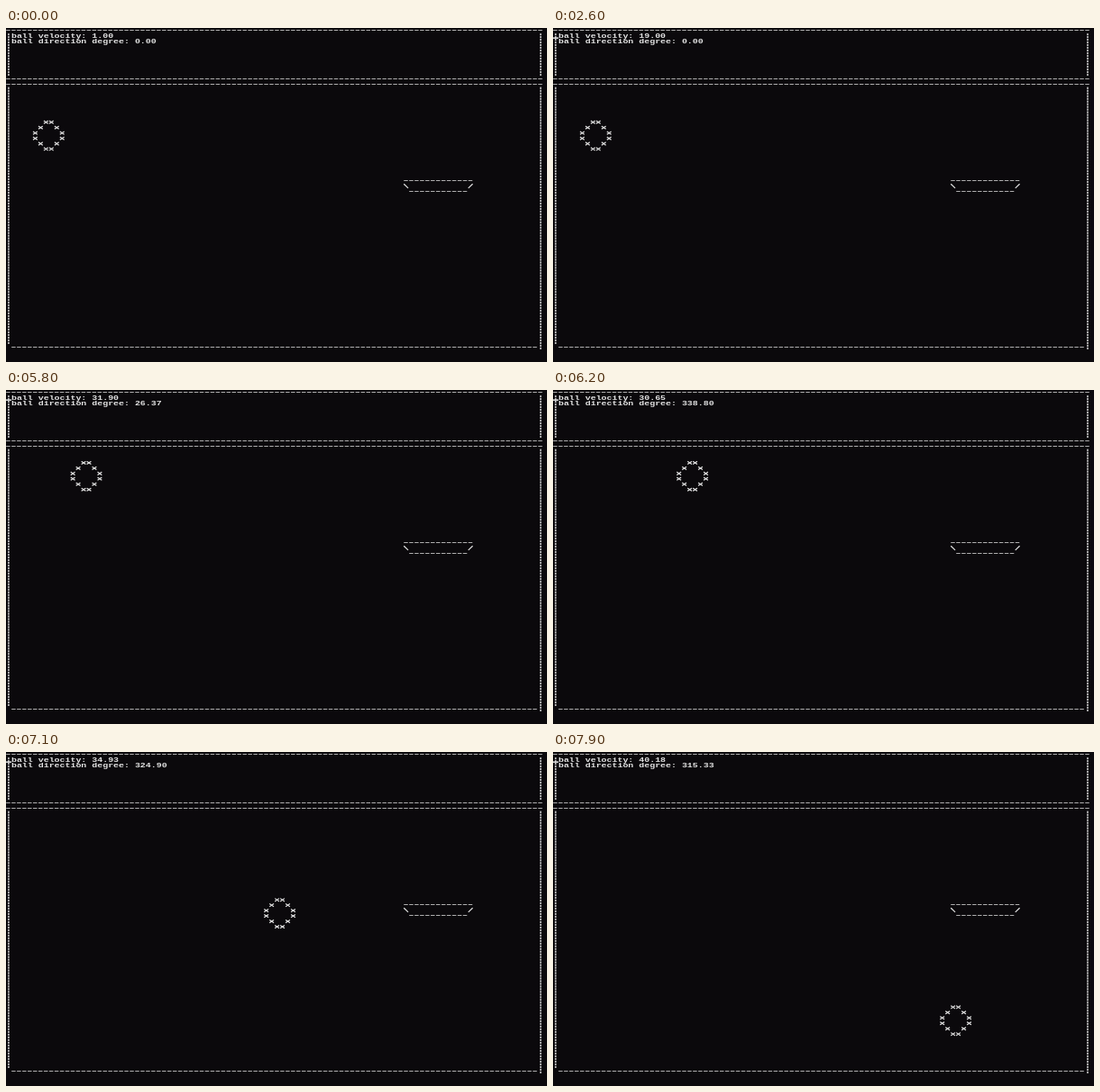
Animation, 600 px wide and 371 px high, one loop 8 s. Source, as an HTML page with a canvas:

```html
<!DOCTYPE html>
<html lang="en">
<head>
<meta charset="utf-8">
<title>Console ball</title>
<style>
  html, body { margin: 0; width: 100%; height: 100%; overflow: hidden; background: #0b090c; }
  canvas { display: block; }
</style>
</head>
<body>
<canvas id="stage" width="600" height="371"></canvas>
<script>
const ctx = document.getElementById('stage').getContext('2d');
const LOOP = 8000, TICK = 100, LAUNCH = 5800;
const CELL = 5.96;
const INK = '#cccccc', BRIGHT = '#e4e4e4', PAPER = '#0b090c';

// key points [ms, value], linear in between
const SPEED = [[400, 1], [1100, 6], [1700, 6], [2700, 20], [4100, 33]];
const ANGLE_STEPS = [[4200, 0], [4900, 5], [5300, 5], [5400, 4]];
const FLIGHT_SECONDS = [[5800, 0.2332], [6200, 0.617], [7100, 1.517], [7900, 2.3334]];

const GRAVITY = 10, VX = 33 * Math.cos(Math.PI / 6), VY = 33 * Math.sin(Math.PI / 6);
const BOUNCE_TIME = 0.417, REBOUND = 9.085;

function interpolate(points, t) {
  const next = points.findIndex(p => p[0] > t);
  if (next === 0) return points[0][1];
  if (next < 0) return points[points.length - 1][1];
  const [t0, a] = points[next - 1], [t1, b] = points[next];
  return a + (b - a) * (t - t0) / (t1 - t0);
}

const rise = (v, s) => v * s - GRAVITY * s * s / 2;

function ballState(t) {
  if (t < LAUNCH) {
    return {
      x: 0, y: 0,
      speed: Math.round(interpolate(SPEED, t)),
      angle: 7.5 * Math.round(interpolate(ANGLE_STEPS, t))
    };
  }
  const s = interpolate(FLIGHT_SECONDS, t), after = s - BOUNCE_TIME;
  const vy = after < 0 ? VY - GRAVITY * s : -REBOUND - GRAVITY * after;
  const y = after < 0 ? rise(VY, s) : rise(VY, BOUNCE_TIME) + rise(-REBOUND, after);
  const degrees = Math.atan2(vy, VX) * 180 / Math.PI;
  return { x: Math.round(VX * s), y: Math.round(y), speed: Math.hypot(VX, vy), angle: (degrees + 360) % 360 };
}

function dashes(row, from, to) {
  const y = Math.round(row * CELL + 2.2);
  for (let col = from; col <= to; col++) ctx.fillRect(col * CELL + 0.2, y, 4.5, 0.85);
}

function bars(col, from, to) {
  for (let row = from; row <= to; row++) {
    for (const part of [0.1, 3.1]) ctx.fillRect(col * CELL + 2.1, row * CELL + part, 1.6, 2.2);
  }
}

function stroke(col, row, x0, y0, x1, y1) {
  const x = col * CELL, y = row * CELL;
  ctx.beginPath();
  ctx.moveTo(x + x0, y + y0);
  ctx.lineTo(x + x1, y + y1);
  ctx.stroke();
}

function cross(col, row) {
  stroke(col, row, 0.2, 1.7, 5, 5);
  stroke(col, row, 5, 1.7, 0.2, 5);
}

function ball(col, row) {
  [2, 1, 0, 0, 1, 2].forEach((inset, i) => {
    cross(col + inset, row + i);
    cross(col + 5 - inset, row + i);
  });
}

function text(row, string) {
  ctx.save();
  ctx.translate(CELL, row * CELL + 5.2);
  ctx.scale(1, 0.74); // square console cells
  ctx.fillText(string, 0, 0);
  ctx.restore();
}

function draw(t) {
  ctx.fillStyle = PAPER;
  ctx.fillRect(0, 0, 600, 371);
  ctx.fillStyle = INK;
  ctx.strokeStyle = BRIGHT;
  ctx.lineWidth = 1.2;
  ctx.font = `bold ${CELL / 0.6001}px "Liberation Mono", monospace`;

  for (const row of [0, 9, 10]) dashes(row, 0, 99);
  dashes(59, 1, 98);
  for (const [col, bottom] of [[0, 58], [99, 59]]) {
    bars(col, 1, 8);
    bars(col, 11, bottom);
  }

  dashes(28, 74, 86);
  stroke(74, 29, 0.2, 0.4, 5, 5);
  stroke(86, 29, 5, 0.4, 0.2, 5);
  dashes(30, 75, 85);

  const state = ballState(t);
  ball(5 + state.x, 17 - state.y);
  ctx.fillStyle = BRIGHT;
  text(1, 'ball velocity: ' + state.speed.toFixed(2));
  text(2, 'ball direction degree: ' + state.angle.toFixed(2));
  if (t >= 200) ctx.fillRect(0, 10.4, 6, 1.5); // cursor
}

function frame() {
  const t = performance.now() % LOOP;
  draw(Math.floor(t / TICK) * TICK);
  requestAnimationFrame(frame);
}
frame();
</script>
</body>
</html>
```
